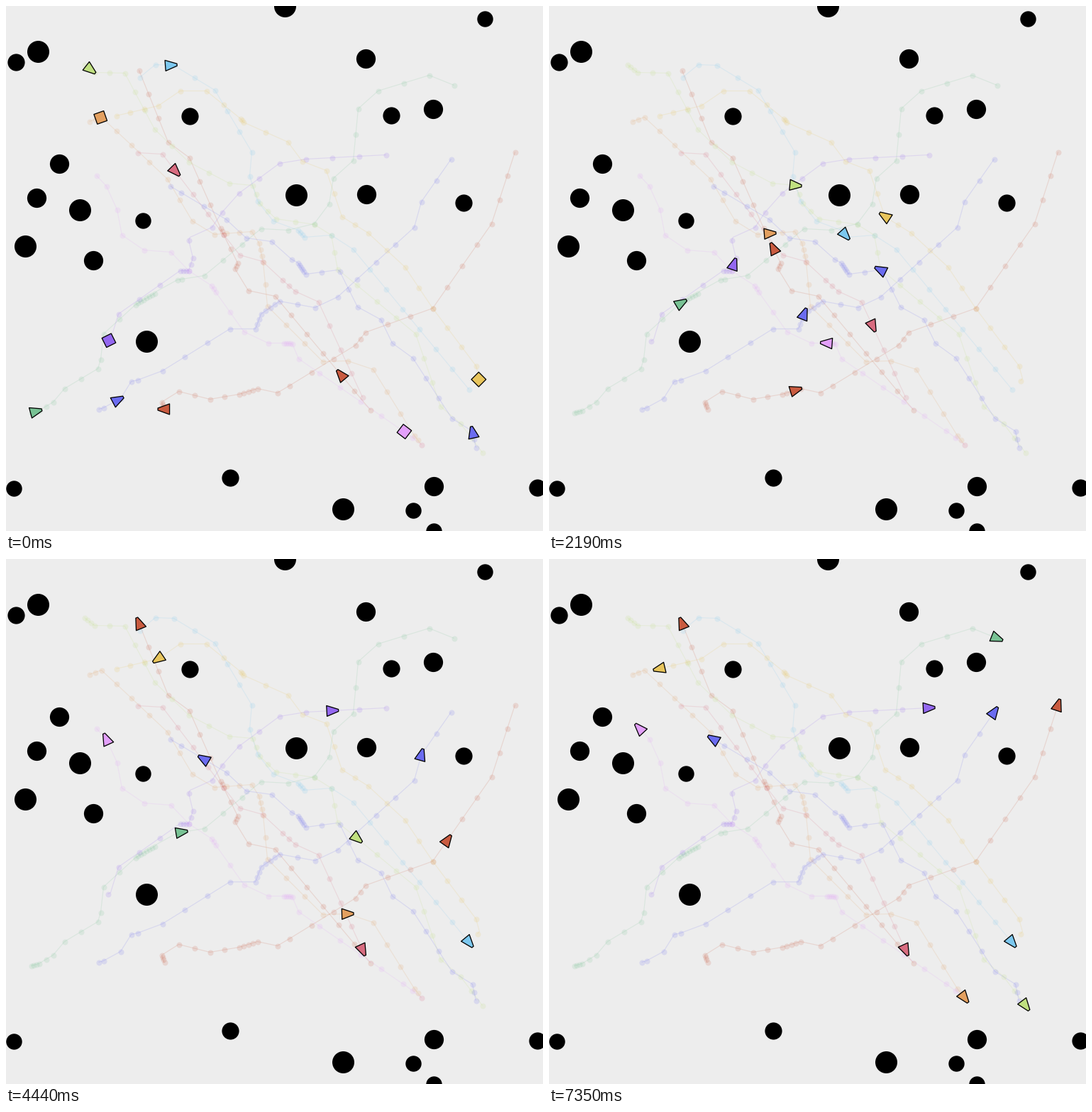
Animation of 757 by 739 pixels, one loop 7.65 s. Source, as a matplotlib script:

```python
import numpy as np
import matplotlib.pyplot as plt
from matplotlib.animation import FuncAnimation
from matplotlib.collections import LineCollection, PolyCollection

W, H, DPI = 757, 739, 100
FRAMES, INTERVAL = 255, 30
PX = 72 / DPI
STRIDE = 39  # longest move in one step, in pixels

RED, BLUE, PURPLE = "#c95b40", "#6b6cf0", "#9468f0"
LIME, CYAN, ROSE = "#c0e080", "#7cc8ef", "#d86c80"
ORANGE, GOLD, GREEN, PINK = "#e3a060", "#e8c55c", "#78c294", "#e3a0fa"

# simulation step reached at given times (ms)
CLOCK_MS = [0, 1520, 2850, 3720, 4440, 5840, 7350]
CLOCK_STEP = [1.85, 9.43, 16.55, 20.93, 25.0, 32.1, 40.1]

WEDGE = np.array([(-8, -7.5), (8.5, -1.5), (8.5, 1.5), (-8, 7.5)])
SQUARE = 7.3 * np.array([(-1, -1), (1, -1), (1, 1), (-1, 1)])


class Agent:
    """Cruises between turns in whole steps; (x, y, n) takes n steps."""

    def __init__(self, color, *turns, rest=(-1, -1)):
        self.color, self.rest = color, rest
        self.turns = np.array([t[:2] for t in turns], float)
        legs = np.hypot(*np.diff(self.turns, axis=0).T)
        steps = [t[2] if len(t) > 2 else np.ceil(d / STRIDE)
                 for t, d in zip(turns[1:], legs)]
        self.times = np.concatenate([[0], np.cumsum(steps)])
        self.end = self.times[-1]

        self.trail = self.at(np.arange(self.end + 1))
        moved = np.hypot(*np.diff(self.trail, axis=0).T) > 3
        self.dots = self.trail[np.append(True, moved)]

    def at(self, step):
        return np.stack([np.interp(step, self.times, c) for c in self.turns.T], -1)

    def heading(self, step):
        """Direction of the latest step that moved."""
        for back in range(1, 9):
            dx, dy = self.at(step) - self.at(step - back)
            if np.hypot(dx, dy) > 0.3:
                break
        return np.arctan2(dy, dx)

    def shape(self, step):
        body = SQUARE if self.rest[0] <= step < self.rest[1] else WEDGE
        step = min(step, self.end)
        a = self.heading(step)
        c, s = np.cos(a), np.sin(a)
        return body @ np.array([(c, s), (-s, c)]) + self.at(step)


agents = [
    Agent(RED, (223, 567), (222, 567, 2), (219, 557, 3), (243, 542), (287, 553),
          (328, 546), (354, 538, 4), (382, 544), (399, 534), (492, 477),
          (506, 459, 2), (601, 425), (684, 306), (717, 205)),
    Agent(RED, (513, 568), (379, 408), (379, 408, 2), (341, 400), (322, 369),
          (326, 361, 2), (306, 321), (302, 312, 2), (258, 213), (228, 191),
          (187, 90)),
]


def add(*args, **kw):
    agents.append(Agent(*args, **kw))


add(LIME, (110, 82), (124, 93, 3), (167, 94), (209, 173), (257, 219), (314, 249),
    (347, 252), (347, 252, 2), (357, 277, 2), (380, 299, 2), (434, 307),
    (458, 322), (467, 370), (577, 461), (612, 563), (640, 587), (671, 628))

add(CYAN, (188, 100), (210, 82), (236, 83), (294, 118), (346, 205), (343, 239),
    (354, 274), (376, 302), (411, 315), (420, 325, 3), (458, 322), (489, 342),
    (652, 539), rest=(31, 33))

add(PURPLE, (143, 471), (147, 469, 5), (158, 433), (245, 372), (257, 372, 3),
    (263, 354, 2), (257, 329), (259, 325, 3), (290, 311), (304, 290), (328, 263),
    (385, 221), (422, 215), (535, 209), rest=(0, 4))

add(ORANGE, (117, 162), (134, 156, 2), (134, 156, 1), (176, 195), (227, 243),
    (262, 302), (293, 321), (293, 321, 2), (346, 317, 3), (356, 333),
    (362, 360, 3), (368, 422), (446, 500), (481, 499), (517, 511), (575, 604),
    (585, 617, 2), rest=(0, 3))

add(GOLD, (664, 527), (667, 524, 3), (662, 506), (601, 425), (562, 367),
    (510, 319), (473, 296), (451, 231), (417, 218), (397, 191), (334, 163),
    (330, 158, 2), (282, 119), (245, 119), (214, 140), (155, 154, 3), rest=(0, 3))

add(ROSE, (185, 206), (220, 208), (306, 321), (306, 321, 1), (329, 350),
    (361, 359), (389, 385), (407, 401, 2), (440, 416), (502, 550))

add(BLUE, (662, 621), (657, 598, 2), (628, 580), (573, 495), (544, 474),
    (528, 441), (495, 423), (470, 373), (467, 371, 2), (422, 377), (411, 361, 5),
    (402, 356), (374, 331), (338, 326), (310, 300), (246, 262), (231, 253))

add(BLUE, (130, 567), (137, 565), (161, 552), (176, 528), (185, 526), (220, 513),
    (315, 454), (351, 454), (351, 454, 1), (359, 433, 3), (385, 415, 4),
    (435, 424), (467, 409), (575, 311), (585, 275), (627, 215))

add(PINK, (585, 617), (559, 597, 2), (558, 597), (412, 496), (403, 475),
    (391, 474, 4), (369, 474), (335, 458), (295, 402), (289, 393, 2), (257, 372),
    (232, 346), (194, 343), (163, 322), (156, 286), (141, 253), (127, 238),
    rest=(0, 3))

add(GREEN, (35, 572), (46, 569, 3), (66, 557, 2), (82, 538), (129, 510),
    (133, 497), (137, 461), (182, 420), (209, 404, 7), (212, 401, 4), (241, 385),
    (247, 384), (279, 379), (359, 313), (397, 315), (434, 306), (455, 278),
    (461, 242), (489, 217), (496, 144), (524, 119), (596, 97), (631, 111),
    rest=(20, 23))

# obstacle centres by radius
OBSTACLES = {
    11.2: [(192, 301), (674, 17), (10, 678), (573, 709), (602, 738)],
    12.1: [(13, 78), (258, 154), (542, 153), (644, 276), (315, 663.5), (748, 677)],
    13.6: [(506, 73), (601.5, 144), (507, 264), (42.5, 269), (122, 357), (74, 221),
           (602, 675)],
    15.5: [(44, 63), (392, -1), (408, 265), (103, 286), (26, 337), (197.5, 471),
           (474, 707.5)],
}

fig = plt.figure(figsize=(W / DPI, H / DPI), dpi=DPI, facecolor="#ededed")
ax = fig.add_axes([0, 0, 1, 1])
ax.set_xlim(-0.5, W - 0.5)
ax.set_ylim(H - 0.5, -0.5)
ax.axis("off")


def discs(centres, r, **kw):
    ax.scatter(*np.transpose(centres), s=(2 * r * PX) ** 2, linewidths=0, **kw)


for r, centres in OBSTACLES.items():
    discs(centres, r, c="black", zorder=1)

colors = [a.color for a in agents]
ax.add_collection(LineCollection([a.trail for a in agents], colors=colors,
                                 linewidths=1.2 * PX, alpha=0.16, zorder=2))
for a in agents:
    discs(a.dots, 4, c=a.color, alpha=0.16, zorder=2)

bodies = PolyCollection([WEDGE], facecolors=colors, edgecolors="black",
                        linewidths=1.3 * PX, zorder=3)
ax.add_collection(bodies)


def update(i):
    step = np.interp(i * INTERVAL, CLOCK_MS, CLOCK_STEP)
    bodies.set_verts([a.shape(step) for a in agents])
    return (bodies,)


anim = FuncAnimation(fig, update, frames=FRAMES, interval=INTERVAL,
                     repeat=True, repeat_delay=0, blit=True)
plt.show()
```
